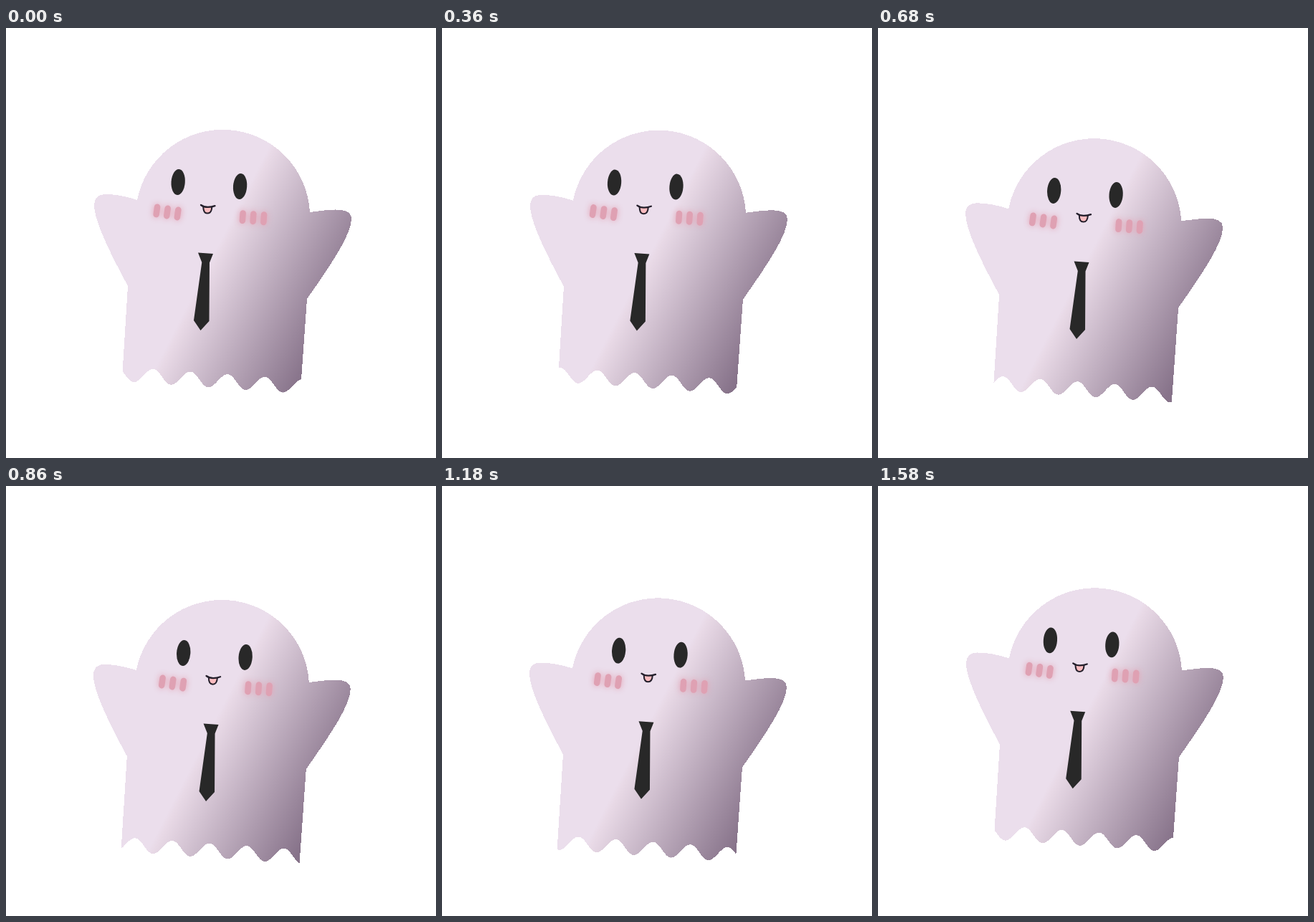
An HTML page that plays this animation: 600 px wide and 600 px high, repeating every 1600 ms.

```html
<!DOCTYPE html>
<html lang="en">
<head>
<meta charset="utf-8">
<title>Floating ghost</title>
<style>
  html, body { margin: 0; height: 100%; overflow: hidden; background: #fff; }
  svg { display: block; width: 100%; height: 100%; }
  .ink { fill: #282828; }
  .line { fill: none; stroke: #241f2b; stroke-width: 2.3; stroke-linecap: round; }
  .cheek { fill: #dfa1b3; filter: drop-shadow(0 0 4px #e3a3b5); }
</style>
</head>
<body>
<svg viewBox="0 0 600 600">
  <defs>
    <linearGradient id="shade" gradientUnits="userSpaceOnUse" x1="289" y1="317" x2="456" y2="403">
      <stop offset="0" stop-color="#ebdeec"/>
      <stop offset=".04" stop-color="#e8d9e6"/>
      <stop offset="1" stop-color="#87738a"/>
    </linearGradient>
    <g id="bars">
      <rect x="-19" y="-9.5" width="8.5" height="19" rx="4.25"/>
      <rect x="-4.25" y="-9.5" width="8.5" height="19" rx="4.25"/>
      <rect x="10.5" y="-9.5" width="8.5" height="19" rx="4.25"/>
    </g>
    <path id="lid" d="M228 221.5C231 232.5 244.5 233.5 249.5 223"/>
  </defs>
  <g id="ghost">
    <path id="body" fill="url(#shade)" shape-rendering="crispEdges"/>
    <g id="face">
      <g id="open" class="ink">
        <ellipse rx="9.6" ry="18" transform="translate(240.2 215) rotate(4)"/>
        <ellipse rx="9.6" ry="18" transform="translate(326.6 221) rotate(4)"/>
      </g>
      <g id="closed" class="line">
        <use href="#lid"/>
        <use href="#lid" x="87" y="6"/>
      </g>
      <g class="cheek"><use href="#bars" transform="translate(225 257) rotate(8)"/></g>
      <g class="cheek"><use href="#bars" transform="translate(345 264.7) rotate(4)"/></g>
      <path class="line" style="fill:#fbbcc0;stroke-width:2" d="M275.3 249.5C275.3 255 277 258.6 281 258.6S287 255.5 287.3 250"/>
      <path class="line" d="M272 247Q276 250 281.5 250T291.5 248.2"/>
      <path class="ink" d="M268 313.5L289 315 284 327.5 283.5 409 271.5 422 262 408 273.3 327Z"/>
    </g>
  </g>
</svg>
<script>
const LOOP = 1600, TILT = 0.0692, PITCH = 52;
const el = id => document.getElementById(id);
const outline = 'C143 310 123 268 123 247C123 238 128 232 138 232C150 232 165 234 183 240' +
  'A121.75 121.75 0 0 1 424 257C440 255 450 253.5 460 253.5' +
  'C474 253.5 482 257 482 266C482 288 455 328 420 378';

// Scalloped hem, drawn right to left along the tilted base line
function hem(progress) {
  let path = '';
  for (let u = 249.1; u > -0.5; u -= 1) {
    const h = 10 * Math.cos(2 * Math.PI * ((u - 16.5) / PITCH - progress));
    path += `L${(162.2 + u - TILT * h).toFixed(2)} ${(483 + TILT * u + h).toFixed(2)}`;
  }
  return path;
}

// Shift along the ghost's own tilted axes
function shift(id, x, y) {
  el(id).setAttribute('transform', `translate(${x - TILT * y} ${y + TILT * x})`);
}

function draw(now) {
  const t = now % LOOP;
  const swing = -Math.cos(2 * Math.PI * (t - 165) / LOOP);
  const blink = t >= 100 && t < 300;
  el('body').setAttribute('d', 'M170 360' + outline + hem(t / LOOP) + 'Z');
  shift('ghost', 0, 9.95 * (swing + 0.797));
  shift('face', 5.1 * (swing + 0.797), 1.8 * swing * swing - 1.15);
  el('open').style.display = blink ? 'none' : '';
  el('closed').style.display = blink ? '' : 'none';
}

const start = performance.now();
function frame() {
  draw(performance.now() - start);
  requestAnimationFrame(frame);
}
frame();
</script>
</body>
</html>
```
